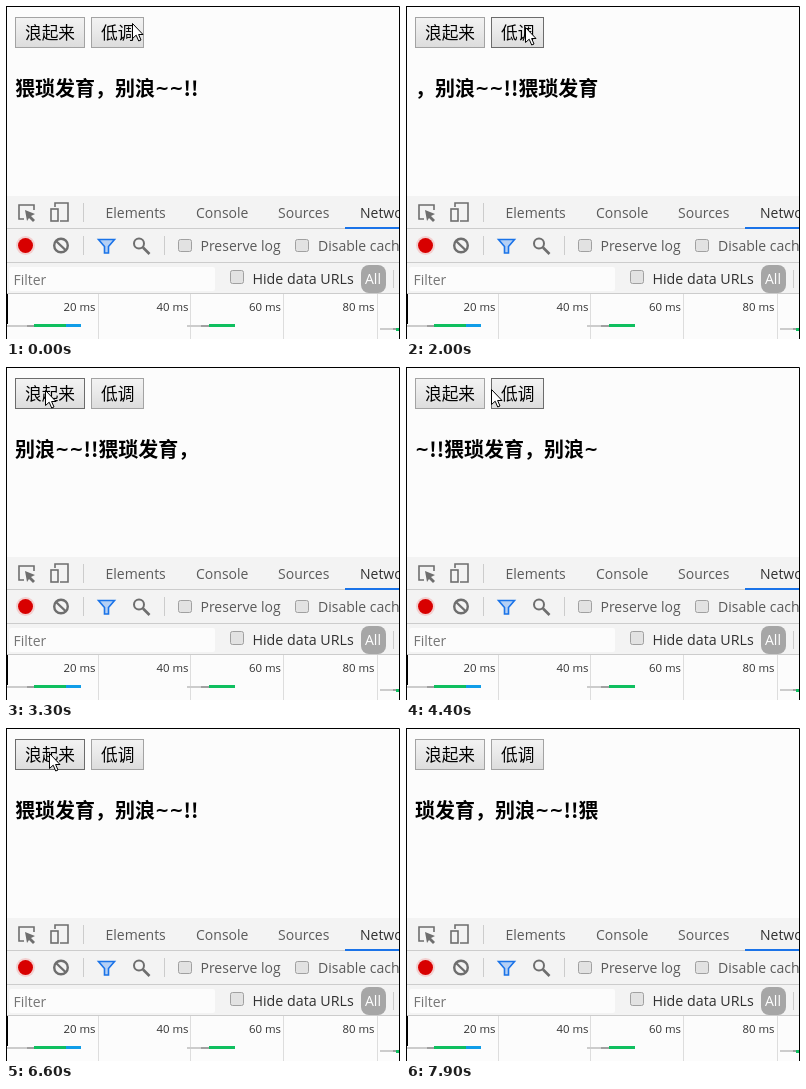
Recreate the animation shown at these times as an HTML page. Size 394 by 333 pixels, loop 8.2 s.

```html
<!DOCTYPE html>
<html lang="zh-CN">
<head>
<meta charset="utf-8">
<style>
  html, body { margin: 0; width: 100%; height: 100%; overflow: hidden; background: #fcfcfc; }
  svg { display: block; }
  text { font: 14px "Open Sans", "Noto Sans", sans-serif; fill: #5a5a5a; white-space: pre; }
  .cjk { font: 16.67px "Noto Sans CJK SC", "Noto Sans CJK", sans-serif; fill: #000; }
  #title { font-size: 20px; font-weight: bold; }
  #title .wave { font: bold 17px "DejaVu Sans", sans-serif; baseline-shift: 2px; }
  .button rect { fill: url(#raised); stroke: #a3a3a3; }
  .button.hover rect { stroke: #6c6c6c; }
  .button.pressed rect { fill: url(#sunken); }
  .icon { fill: none; stroke: #6e6e6e; stroke-width: 2; }
  .check { fill: #e2e2e2; stroke: #a0a0a0; }
  .small { font-size: 11.4px; fill: #333; text-anchor: end; }
  .dark { fill: #303030; }
</style>
</head>
<body>
<svg width="394" height="333" viewBox="0 0 394 333">
  <defs>
    <linearGradient id="raised" x2="0" y2="1">
      <stop stop-color="#f2f2f2"/><stop offset=".4" stop-color="#ebebeb"/><stop offset="1" stop-color="#dcdcdc"/>
    </linearGradient>
    <linearGradient id="sunken" x2="0" y2="1">
      <stop stop-color="#d6d6d6"/><stop offset="1" stop-color="#e8e8e8"/>
    </linearGradient>
  </defs>
  <rect width="394" height="333" fill="#fcfcfc"/>

  <g class="button"><rect x="9.5" y="11.5" width="69" height="30"/><text class="cjk" x="19" y="33.3">浪起来</text></g>
  <g class="button"><rect x="85.5" y="11.5" width="52" height="30"/><text class="cjk" x="95" y="33.3">低调</text></g>
  <text id="title" class="cjk" x="9" y="89.5"></text>

  <!-- tab bar -->
  <rect y="190" width="394" height="98" fill="#f3f3f3"/>
  <path d="M0 222.5H394M0 256.5H394M0 287.5H394M77.5 197V216M77.5 230V249M158.5 230V249M387.5 264V282" stroke="#ccc"/>
  <g class="icon">
    <path d="M18 213H13V199H28V204" stroke-width="1.6"/>
    <path d="M19 204L29 208L25 210L29 214L27 216L23 212L21 215Z" fill="#6e6e6e" stroke="none"/>
    <path d="M49 201V197H62V215H54" stroke-width="1.6"/>
    <rect x="45" y="203" width="7" height="12" stroke-width="1.6"/>
  </g>
  <text x="99.5" y="212">Elements</text>
  <text x="190" y="212">Console</text>
  <text x="272" y="212">Sources</text>
  <text x="354" y="212" class="dark">Network</text>
  <rect x="339" y="221" width="55" height="2" fill="#1a73e8"/>

  <!-- network toolbar -->
  <circle cx="19.5" cy="239.5" r="9.5" fill="#f3cfcf"/>
  <circle cx="19.5" cy="239.5" r="7.5" fill="#d80000"/>
  <g class="icon">
    <circle cx="55" cy="239.5" r="6.8" stroke-width="2.4"/><path d="M50 235L60 244.5" stroke-width="2.4"/>
    <path d="M92.5 233.5H108.5L102.5 240.5V247H98.5V240.5Z" stroke="#1a73e8" stroke-width="1.6" fill="#b5d0f5"/>
    <circle cx="133" cy="237.5" r="5"/><path d="M137 241.5L143.5 248" stroke-width="2.6"/>
  </g>
  <rect class="check" x="172.5" y="233.5" width="13" height="12" rx="2"/>
  <text x="194.5" y="245">Preserve log</text>
  <rect class="check" x="289.5" y="233.5" width="13" height="12" rx="2"/>
  <text x="312" y="245">Disable cache</text>

  <!-- filter bar -->
  <rect x="3" y="261" width="206" height="24" rx="2" fill="#fcfcfc"/>
  <text x="7.5" y="279" style="fill:#757575">Filter</text>
  <rect class="check" x="224.5" y="264.5" width="13" height="13" rx="2"/>
  <text x="246.5" y="278" class="dark" style="font-size:14.25px">Hide data URLs</text>
  <rect x="355" y="259" width="25" height="28" rx="8" fill="#a6a6a6"/>
  <text x="359" y="278" style="fill:#fff">All</text>

  <!-- timeline -->
  <rect y="288" width="394" height="45" fill="#fcfcfc"/>
  <path d="M92.5 288V333M184.5 288V333M277.5 288V333M371.5 288V333" stroke="#ddd"/>
  <text class="small" x="89.5" y="305">20 ms</text>
  <text class="small" x="182.5" y="305">40 ms</text>
  <text class="small" x="275" y="305">60 ms</text>
  <text class="small" x="368.5" y="305">80 ms</text>
  <g fill="none" stroke-width="2">
    <path d="M1 320H21M181 320H195M374 323H387" stroke="#ccc"/>
    <path d="M21 320H28M195 320H203M387 323H390" stroke="#a0a0a0"/>
    <path d="M28 319.5H60M203 319.5H229M390 323.5H394" stroke="#0fbf5f" stroke-width="3"/>
    <path d="M60 319.5H75" stroke="#109de8" stroke-width="3"/>
  </g>
  <path d="M0 .5H393.5V333M.5 0V333M1.5 288V318" fill="none" stroke="#000"/>

  <path id="cursor" d="M.5 .5V15.5L4.2 12.2L6.7 18L9 17L6.6 11.5H11Z" fill="#fff" stroke="#000"/>
</svg>
<script>
const LOOP = 8200, STEP = 100;
const phrase = [...'猥琐发育，别浪~~!!'];
const shifts = [900, 1300, 1700, 2000, 2400, 3700, 4000, 4400, 4800, 6200, 6600, 7000];
const presses = [200, 2500, 3200, 4900, 5800, 7100];
// time, x, y of the pointer tip
const path = [
  [0, 126, 17], [100, 84, 28], [200, 41, 24], [1200, 41, 24], [1800, 119, 21], [2700, 119, 21],
  [3100, 39, 23], [4100, 39, 23], [4400, 85, 22], [4800, 117, 21], [5300, 117, 21],
  [5700, 43, 25], [6700, 43, 25], [7000, 115, 22], [7300, 119, 22], [7500, 225, 22],
  [7600, 344, 27], [7700, 377, 57], [7800, 388, 104], [7900, 400, 130], [LOOP, 400, 130]
];
const title = document.getElementById('title');
const cursor = document.getElementById('cursor');
const buttons = [...document.querySelectorAll('.button')];
let shown = -1;

function pointerAt(t) {
  const i = path.findIndex(p => p[0] > t);
  const [t0, x0, y0] = path[i - 1], [t1, x1, y1] = path[i];
  const k = (t - t0) / (t1 - t0);
  return [Math.round(x0 + (x1 - x0) * k), Math.round(y0 + (y1 - y0) * k)];
}

function showTitle(shift) {
  if (shift === shown) return;
  shown = shift;
  title.innerHTML = [...phrase.slice(shift), ...phrase.slice(0, shift)]
    .map(c => c === '~' ? '<tspan class="wave">~</tspan>' : c).join('');
}

function draw(now) {
  const t = Math.floor(now % LOOP / STEP) * STEP;
  const [x, y] = pointerAt(t);
  cursor.setAttribute('transform', `translate(${x} ${y})`);
  showTitle(shifts.filter(s => s <= t).length % phrase.length);
  buttons.forEach((button, i) => {
    // hover only registers once the pointer has moved
    const hover = t > 0 && y > 10 && y < 42 && (i ? x >= 85 && x < 138 : x >= 9 && x < 79);
    button.classList.toggle('hover', hover);
    button.classList.toggle('pressed', hover && presses.includes(t));
  });
}

const start = performance.now();
function tick() {
  draw(performance.now() - start);
  requestAnimationFrame(tick);
}
tick();
</script>
</body>
</html>
```
